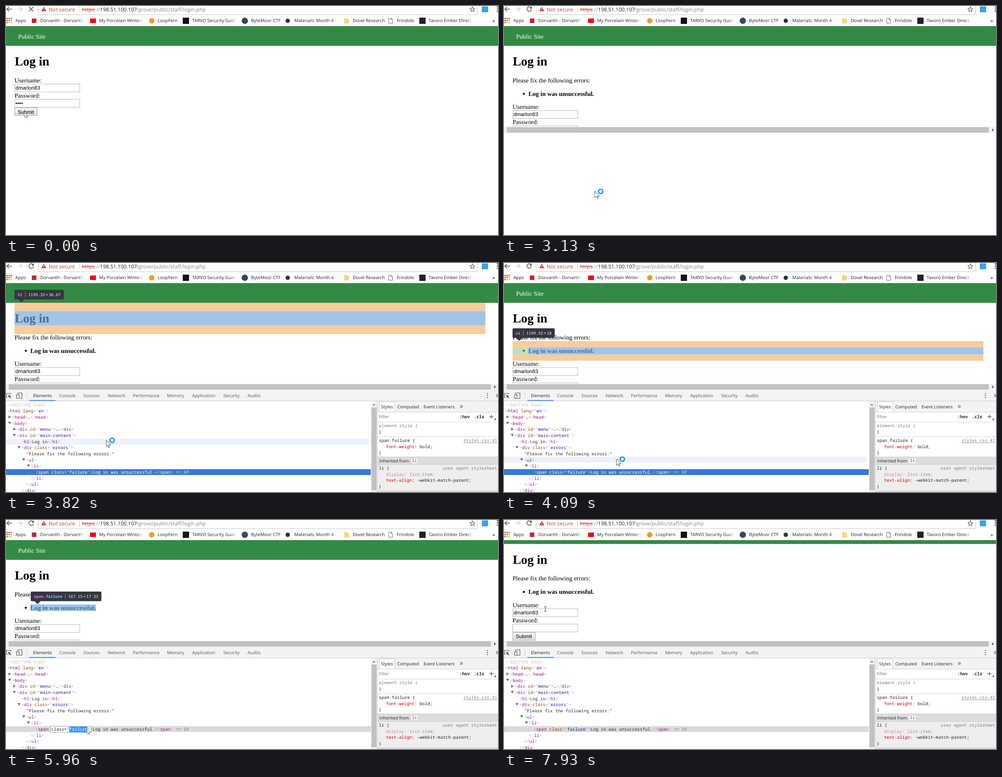
An HTML page for the animation above (8 s loop, 1094 by 512 pixels).

```html
<!DOCTYPE html>
<html lang="en">
<head>
<meta charset="utf-8">
<title>Log in</title>
<style>
  html, body { margin: 0; width: 100%; height: 100%; overflow: hidden; background: #fff; }
  svg { display: block; width: 100vw; height: 100vh; }
  text { white-space: pre; text-rendering: geometricPrecision; fill: #222; }
  .ui { font: 9.8px "Open Sans", "Noto Sans", sans-serif; }
  .mark { font-size: 10px; }
  .bar { font-size: 11.6px; }
  .key { font-size: 10.3px; fill: #a3a3a3; text-anchor: end; }
  .off { fill: #a3a3a3; }
  .serif { font: 13.96px "Liberation Serif", "Times New Roman", serif; fill: #000; }
  .big { font-size: 27.93px; }
  .field { font: 11.64px "Liberation Sans", Arial, sans-serif; fill: #000; }
  .mono { font: 9.6px "Noto Sans Mono", "DejaVu Sans Mono", monospace; }
  .tip { font-size: 8.8px; fill: #fff; }
  .bold { font-weight: bold; }
  .end { text-anchor: end; }
  .br { fill: #a894a6; } .tag { fill: #881280; } .att { fill: #994500; }
  .val { fill: #1a1aa6; } .txt { fill: #303030; } .doc { fill: #c0c0c0; }
  .prop { fill: #c80000; }
  .dim { fill: #7d7d7d; }
  .ref { fill: #8a8a8a; font-style: italic; }
  .active tspan { fill: #fff; } .active .br { fill: #c9d9f5; } .active .ref { fill: #bcd2f4; }
</style>
</head>
<body>
<svg id="stage" viewBox="0 0 1094 512" preserveAspectRatio="none"></svg>
<script>
const LOOP = 8000, ROW = 13.64, ROW_TOP = 310.7, CHAR = 5.76, SELECTED = 11;
const BLUE = '#3aa0ea', GREEN = '#338a45';

const esc = s => s.replace(/&/g, '&amp;').replace(/</g, '&lt;');
const span = (s, cls, more = '') => `<tspan class="${cls}" ${more}>${esc(s)}</tspan>`;
const raw = (x, y, inner, cls, more = '') => `<text x="${x}" y="${y}" class="${cls}" ${more}>${inner}</text>`;
const text = (x, y, s, cls, more) => raw(x, y, esc(s), cls, more);
const rect = (x, y, w, h, fill, more = '') => `<rect x="${x}" y="${y}" width="${w}" height="${h}" fill="${fill}" ${more}/>`;
const dot = (x, y, r, fill) => `<circle cx="${x}" cy="${y}" r="${r}" fill="${fill}"/>`;
const fill = (d, color) => `<path d="${d}" fill="${color}"/>`;
const line = (d, color, w = 1) => `<path d="${d}" fill="none" stroke="${color}" stroke-width="${w}"/>`;
const group = (id, inner) => `<g id="${id}">${inner}</g>`;

// Browser bars
const fade = x => rect(x - 14, 24, 26, 18, 'url(#fade)');

function browser() {
  const gridColors = ['#ea4335', '#ea4335', '#ea4335', '#34a853', '#4285f4', '#fbbc05', '#34a853', '#fbbc05', '#fbbc05'];
  const marks = [
    [76, 'Dorvanth - Dorvanth', 174], [207, 'My Porcelain Winters', 305], [337, 'LoopFern'],
    [414, 'TARVO Security Guide', 512], [545, 'ByteMoor CTF'], [641, 'Materials: Month 4 - C', 739],
    [771, 'Dovel Research'], [869, 'Frindole'], [940, 'Tavoro Ember Direct', 1039]
  ];
  return rect(0, 0, 1094, 45, '#fff')
    + line('M71.5,0V16.5Q71.5,19.5 74.5,19.5H1045Q1048.5,19.5 1048.5,16.5V0', '#c4c4c4')
    + line('M13,7H2M7,2L2,7L7,12', '#505050', 1.5)
    + line('M25,7H36M31,2L36,7L31,12', '#cfcfcf', 1.5)
    + group('stop', line('M51,2L61,12M61,2L51,12', '#505050', 1.6))
    + group('reload', line('M59.8,3.6A5,5 0 1 0 60.8,8', '#505050', 1.5) + fill('M61.8,0.8V6H56.6Z', '#505050'))
    + fill('M84,1.8L89.6,11.8H78.4Z', '#c5392c') + rect(83.4, 5, 1.2, 3.4, '#fff') + rect(83.4, 9.2, 1.2, 1.2, '#fff')
    + text(95, 11.5, 'Not secure', 'ui bar', 'style="fill:#c93a2e"')
    + line('M163.5,1V14', '#ccc')
    + text(169, 11.5, 'https', 'ui bar', 'style="fill:#c93a2e"') + line('M168.5,8H197.5', '#c93a2e')
    + text(197.3, 11.5, '://', 'ui bar', 'style="fill:#888"')
    + text(209, 11.5, '198.51.100.107', 'ui bar')
    + text(290, 11.5, '/grove/public/staff/login.php', 'ui bar', 'style="fill:#848484"')
    + line('M1037,1.8L1038.6,5.6L1042.4,6L1039.5,8.6L1040.4,12.4L1037,10.4L1033.6,12.4L1034.5,8.6L1031.6,6L1035.4,5.6Z', '#555', 1.1)
    + rect(1058, 1, 14, 13, BLUE)
    + [2, 7, 12].map(y => dot(1092.5, y, 1.4, '#555')).join('')
    + gridColors.map((c, i) => rect(1 + i % 3 * 4.5, 26.5 + Math.floor(i / 3) * 4.5, 3, 3, c)).join('')
    + text(21, 36.3, 'Apps', 'ui mark')
    + marks.map(([x, s, end]) => text(x, 36.3, s, 'ui mark') + (end ? fade(end) : '')).join('')
    + rect(57.5, 28, 10, 10, '#c8202f') + rect(187, 28, 13, 10, '#f00')
    + dot(324, 33, 6, '#f29a20') + rect(393, 26, 14, 14, '#111')
    + dot(531, 33, 7, '#2c4a5e') + dot(626.5, 33, 4.8, '#1d3a36')
    + fill('M752,27H757L758,28.5H763V39H752Z', '#f7d677')
    + line('M851,27.5H856.5L859.5,30.5V38.5H851ZM856.5,27.5V30.5H859.5', '#666')
    + rect(919, 26, 14, 14, '#222')
    + text(1081.5, 36.5, '»', 'ui', 'style="font-size:12px"');
}

// Web page
function page() {
  const input = y => rect(19.5, y, 144.5, 17.6, '#fff', 'stroke="#b4b4b4"');
  const form = text(19, 170.9, 'Username:', 'serif') + input(174.5) + text(21, 187.2, 'dmarlon83', 'field')
    + text(19, 205, 'Password:', 'serif') + input(208.7)
    + group('secret', [0, 1, 2, 3].map(i => dot(23 + i * 4.1, 217.5, 1.6, '#000')).join(''))
    + rect(19.5, 227.6, 50, 17.4, 'url(#button)', 'stroke="#a6a6a6"') + text(26, 240.6, 'Submit', 'field');
  return rect(0, 45, 1094, 44, GREEN)
    + text(27, 72.8, 'Public Site', 'serif', 'style="fill:#fff"')
    + text(19.5, 133, 'Log in', 'serif big bold')
    + group('errors', text(19, 170.9, 'Please fix the following errors:', 'serif')
      + dot(44, 196.3, 2.3, '#000') + text(54.3, 200.6, 'Log in was unsuccessful.', 'serif bold'))
    + group('form', form);
}

// Element highlights
const content = (x, y, x2, y2) => rect(x, y, x2 - x, y2 - y, 'rgba(111,168,220,.66)');
const margin = (y, y2) => rect(19, y, 1047, y2 - y, 'rgba(246,178,107,.66)');

function tooltip(x, y, name, w, h) {
  const [tag, cls] = name.split('.'), step = 5.28;
  const sep = x + 13.5 + name.length * step, dims = sep + 6.5;
  const right = dims + (w.length + h.length + 1) * step + 3.4 + 7;
  return rect(x, y, right - x, 21.5, '#333740', 'rx="2"')
    + fill(`M${x + 8},${y + 21}H${x + 22}L${x + 15},${y + 28}Z`, '#333740')
    + raw(x + 7, y + 14, span(tag, '', 'fill="#ee78e6"') + (cls ? span('.' + cls, '', 'fill="#8ccbf2"') : ''), 'mono tip bold')
    + line(`M${sep},${y + 5}V${y + 16.5}`, '#9a9ca0')
    + raw(dims, y + 14, span(w, '') + span('×', '', 'dx="1.7"') + span(h, '', 'dx="1.7"'), 'mono tip');
}

const highlights = {
  h1: margin(89, 107.5) + margin(139.5, 159) + content(19, 107.5, 1066, 139.5) + tooltip(19, 60, 'h1', '1199.33', '36.67'),
  box: content(19, 159, 1066, 204.5) + tooltip(19, 131, 'div.errors', '1199.33', '52'),
  ul: margin(174.5, 188.5) + margin(204.5, 218.5) + rect(19, 188.5, 35, 16, 'rgba(147,196,125,.55)')
    + content(54, 188.5, 1066, 204.5) + tooltip(19, 146, 'ul', '1199.33', '18'),
  li: content(54, 188.5, 1066, 204.5) + tooltip(55, 160, 'li', '1159.33', '18'),
  span: content(54, 188.5, 200, 203.5) + tooltip(55, 160, 'span.failure', '167.15', '17.33')
};
const hoverOf = { 6: 'h1', 7: 'box', 8: 'box', 9: 'ul', 10: 'li', 11: 'span', 12: 'li', 13: 'ul', 14: 'box' };

// Developer panel
function markup(s) {
  let mode = 'txt', out = '';
  for (const part of s.split(/(<\/?|>|="|"| )/)) {
    if (!part) continue;
    let cls = mode;
    if (part[0] === '<') { cls = 'br'; mode = 'tag'; }
    else if (mode !== 'txt') {
      if (part === '>') { cls = 'br'; mode = 'txt'; }
      else if (part === ' ') mode = 'att';
      else if (part === '="') { cls = 'br'; mode = 'val'; }
      else if (part === '"') { cls = 'br'; mode = 'att'; }
    }
    out += span(part, cls);
  }
  return out;
}

// [depth, code, arrow]
const tree = [
  [-1, '<!DOCTYPE html>'], [-1, '<html lang="en">'], [0, '<head>…</head>', '+'], [0, '<body>', '-'],
  [1, '<div id="menu">…</div>', '+'], [1, '<div id="main-content">', '-'], [2, '<h1>Log in</h1>'],
  [2, '<div class="errors">', '-'], [3, '"Please fix the following errors:"'], [3, '<ul>', '-'], [4, '<li>', '-'],
  [5, '<span class="failure">Log in was unsuccessful.</span>'], [4, '</li>'], [3, '</ul>'], [2, '</div>']
];
const rowY = i => Math.round(ROW_TOP + ROW * i);

function treeRow([depth, code, arrow], i) {
  const x = 13.5 + depth * 10.47, mid = ROW_TOP + ROW * (i + .5);
  const shape = arrow === '+' ? `M${x - 8},${mid - 4}v7l5.5,-3.5z` : `M${x - 9},${mid - 3.5}h7l-3.5,5.5z`;
  const inner = i ? markup(code) : span(code, 'doc');
  const row = (arrow ? fill(shape, '#6e6e6e') : '') + raw(x, mid + 3.3, inner, 'mono');
  return i === SELECTED ? group('chosen', dot(1, mid, 1, '#aaa') + row + text(377, mid + 3.3, '== $0', 'mono ref')) : row;
}

function editor() {
  const x = 65.9 + 6 * CHAR, y = ROW_TOP + ROW * (SELECTED + .5) + 3.3;
  return rect(98.5, 461, 90.5, 14, '#fff', 'stroke="#9a9a9a"')
    + rect(x + 7 * CHAR, 461.8, 7 * CHAR, 12.6, '#3390ff')
    + raw(x, y, 'class="<tspan fill="#fff">failure</tspan>"', 'mono');
}

function styles() {
  const mono = (x, mid, s, cls = '') => text(x, mid + 3.3, s, 'mono ' + cls);
  const prop = (mid, name, value, more) => raw(845, mid + 3.3, span(name, 'prop') + span(': ' + value + ';', ''), 'mono', more);
  return rect(825, 309, 269, 203, '#fff') + rect(825, 309, 269, 24, '#f3f3f3')
    + line('M825,333.5H1094M825,355.5H1094M825,388.5H1094', '#d4d4d4')
    + rect(830.5, 310.5, 34, 23, '#fff', 'stroke="#ccc"')
    + text(834, 324.6, 'Styles', 'ui') + text(870, 324.6, 'Computed', 'ui') + text(928.5, 324.6, 'Event Listeners', 'ui')
    + text(1008.5, 324.5, '»', 'ui', 'style="font-size:16px;fill:#555"')
    + text(829, 347, 'Filter', 'ui', 'style="fill:#757575"')
    + mono(1008.5, 343.5, ':hov', 'bold') + mono(1040.5, 343.5, '.cls', 'bold')
    + line('M1075,343.5H1084M1079.5,339V348', '#555', 1.3) + fill('M1089.5,346.5V351H1085Z', '#555')
    + mono(829, 364, 'element.style {', 'dim') + mono(829, 378, '}')
    + mono(829, 397, 'span.failure {') + mono(1092, 397, 'styles.css:41', 'end dim')
    + line('M1017,402H1092', '#777', .8)
    + prop(411, 'font-weight', 'bold') + mono(829, 424.5, '}')
    + rect(825, 433.5, 269, 17, '#ddd') + line('M825,433.5H1094M825,450.5H1094', '#ccc')
    + text(830, 445.7, 'Inherited from', 'ui') + rect(900.5, 436, 15.5, 12.5, '#fff', 'stroke="#ccc"') + mono(902.5, 442, 'li', 'tag')
    + rect(825, 451, 269, 54, '#eee') + mono(829, 459, 'li {') + mono(1092, 459, 'user agent stylesheet', 'end dim')
    + prop(473, 'display', 'list-item', 'opacity=".45"') + prop(486, 'text-align', '-webkit-match-parent') + mono(829, 499.5, '}')
    + rect(825, 505, 269, 4, '#eee') + rect(825, 509, 269, 3, '#ddd') + line('M825,509.5H1094', '#ccc')
    + rect(900.5, 511, 15.5, 2, '#fff', 'stroke="#ccc"')
    + line('M825.5,309V512', '#ccc');
}

function devtools() {
  const tabs = [[60, 'Elements'], [118, 'Console'], [172, 'Sources'], [226, 'Network'], [282, 'Performance'],
    [358, 'Memory'], [414, 'Application'], [483, 'Security'], [537, 'Audits']];
  return rect(0, 284, 1094, 25, '#f3f3f3') + line('M0,308.5H1094', '#ccc')
    + line('M4,300.5H1V291.5H10.5V294', '#5a5a5a', 1.1) + fill('M4.5,294.5L11.5,297.5L8.8,298.6L11.5,301.4L10.3,302.5L7.6,299.8L6.4,302Z', '#5a5a5a')
    + line('M26,294V290.5H35.5V302.5H30M23.5,294.5H29V302.5H23.5Z', '#5a5a5a', 1.2) + line('M46.5,290V303', '#ccc')
    + tabs.map(([x, s]) => text(x, 300.3, s, 'ui', x > 60 ? 'style="fill:#555"' : '')).join('')
    + rect(52, 306.5, 58, 1.8, '#4285f4')
    + [292, 296.5, 301].map(y => dot(1070.5, y, 1.2, '#5a5a5a')).join('')
    + line('M1090,293L1097,300M1097,293L1090,300', '#5a5a5a', 1.3)
    + rect(0, 309, 825, 203, '#fff')
    + rect(0, 0, 807, 13, '#ebf2fc', 'id="hover" rx="2"')
    + rect(0, rowY(SELECTED), 811, 13, '#dadada', 'id="selection"')
    + tree.map(treeRow).join('')
    + rect(811.5, 309, 13.5, 203, '#f1f1f1') + rect(812.5, 323, 11.5, 185, '#c1c1c1') + fill('M814.5,318.5H821.5L818,314.5Z', '#8a8a8a')
    + styles() + group('editor', editor());
}

const scrollbar = rect(0, 270, 1094, 242, '#fff') + rect(0, 270, 1094, 14, '#f1f1f1')
  + rect(6, 271, 1072, 12, '#c1c1c1') + fill('M1085.5,273.8L1089.5,277L1085.5,280.2Z', '#505050');

// Context menu
const menuItems = [
  [206, 'Back', 'Alt+Left Arrow'], [226, 'Forward', 'Alt+Right Arrow'], [246, 'Reload', 'Ctrl+R'],
  [276, 'Save as...', 'Ctrl+S'], [296, 'Print...', 'Ctrl+P'], [316, 'Cast...'], [336, 'Translate to English'],
  [366, 'Save current session'], [395.5, 'View page source', 'Ctrl+U'], [415.5, 'Inspect', 'Ctrl+Shift+I']
];
const menu = rect(133.5, 194.5, 240, 235, '#000', 'opacity=".2"') + rect(132.5, 193.5, 240, 235, '#000', 'opacity=".4"')
  + rect(131.5, 192.5, 240, 235, '#fff', 'stroke="#b5b5b5"')
  + rect(132, 0, 239, 20, '#e6e6e6', 'id="menuHover"')
  + line('M132,260H371M132,349.5H371M132,379.5H371', '#e6e6e6')
  + rect(141, 358.5, 14, 13.5, BLUE)
  + menuItems.map(([y, s, key]) => text(163, y + 3.6, s, 'ui mark' + (s === 'Forward' ? ' off' : ''))
    + (key ? text(345.5, y + 3.6, key, 'ui key') : '')).join('');

const arrow = '<path d="M0,0V11.2L2.6,8.8L4.4,12.6L6,11.9L4.3,8.2H7.9Z" fill="#fff" stroke="#333" stroke-width=".7"';
const cursor = group('arrow', arrow + '/>')
  + group('busy', arrow + ' transform="scale(1.3)"/><circle cx="13" cy=".5" r="4.8" fill="#fff" stroke="#1c97ea" stroke-width="3"/>')
  + group('beam', line('M-3,-5H-.8L0,-4.4L.8,-5H3M0,-4.4V4.6M-3,5H-.8L0,4.4L.8,5H3', '#333', 1));

const stop = (offset, opacity, color) => `<stop offset="${offset}" stop-color="${color}" stop-opacity="${opacity}"/>`;
const $ = id => document.getElementById(id);
$('stage').innerHTML = `<defs>
  <linearGradient id="fade">${stop(0, 0, '#fff') + stop(.55, 1, '#fff')}</linearGradient>
  <linearGradient id="button" x2="0" y2="1">${stop(0, 1, '#f7f7f7') + stop(1, 1, '#dcdcdc')}</linearGradient></defs>`
  + rect(0, 0, 1094, 512, '#fff') + group('page', page())
  + Object.entries(highlights).map(([id, s]) => group('hl-' + id, s)).join('')
  + browser() + group('scrollbar', scrollbar) + group('devtools', devtools())
  + group('menu', menu) + group('cursor', cursor);

// The picture only changes at these moments: [from, to, steps]
const bursts = [[0, 0, 1], [270, 1230, 8], [1790, 2430, 6], [2730, 2730, 1], [3130, 4090, 8], [4210, 5160, 8],
  [5310, 5430, 2], [5830, 6770, 8], [6920, 7080, 2], [7360, 7930, 5]];
const ticks = bursts.flatMap(([a, b, n]) =>
  Array.from({ length: n }, (_, i) => n > 1 ? Math.round((a + (b - a) * i / (n - 1)) / 10) * 10 : a));

const path = [[0, 41, 238], [200, 41, 238], [1230, 131, 193], [1790, 131, 193], [2430, 202, 414], [3270, 202, 414],
  [3820, 223, 396], [4090, 250, 438], [4210, 270, 450], [4750, 339, 475], [5160, 138, 464], [5430, 154, 466],
  [5830, 154, 466], [5960, 180, 467], [6100, 182, 467], [6770, 270, 233], [7080, 221, 199], [7220, 221, 199], [7790, 92, 199]];
const scroll = [[7300, 0], [7640, 35.4]];

function at(keys, t) {
  const next = keys.findIndex(k => k[0] > t);
  if (next < 0) return keys[keys.length - 1].slice(1);
  if (!next) return keys[0].slice(1);
  const a = keys[next - 1], b = keys[next], u = (t - a[0]) / (b[0] - a[0]);
  return a.slice(1).map((v, i) => v + (b[i + 1] - v) * u);
}

const show = (id, on) => { $(id).style.display = on ? '' : 'none'; };
const move = (id, x, y) => $(id).setAttribute('transform', `translate(${x} ${y})`);

function draw(now) {
  const t = ticks.filter(k => k <= now).pop();
  const [x, y] = at(path, t), [top] = at(scroll, t);
  const failed = t >= 400, panel = t >= 3400, editing = t >= 5830 && t < 6640;

  show('stop', !failed); show('reload', failed);
  show('errors', failed); show('secret', !failed);
  move('form', 0, failed ? 59.3 : 0);
  move('page', 0, -top);

  const open = t >= 1790 && t < 2730;
  show('menu', open);
  const item = menuItems.find(([mid]) => Math.abs(mid - y) < 10);
  show('menuHover', t > 1790 && item);
  if (item) $('menuHover').setAttribute('y', item[0] - 10);

  show('scrollbar', t >= 3130); show('devtools', panel);
  const row = Math.floor((y - ROW_TOP) / ROW), target = panel ? hoverOf[row] : null;
  for (const id in highlights) show('hl-' + id, id === target);
  show('hover', target && row !== SELECTED);
  $('hover').setAttribute('y', rowY(row));
  $('selection').setAttribute('fill', t < 5830 ? '#3778d9' : '#dadada');
  $('chosen').setAttribute('class', t < 5830 ? 'active' : '');
  show('editor', editing);

  const busy = t >= 2730 && t < 4900, beam = t >= 7630;
  move('cursor', x, y);
  show('busy', busy); show('beam', beam); show('arrow', !busy && !beam);
}

function frame() {
  draw(performance.now() % LOOP);
  requestAnimationFrame(frame);
}
frame();
</script>
</body>
</html>
```
